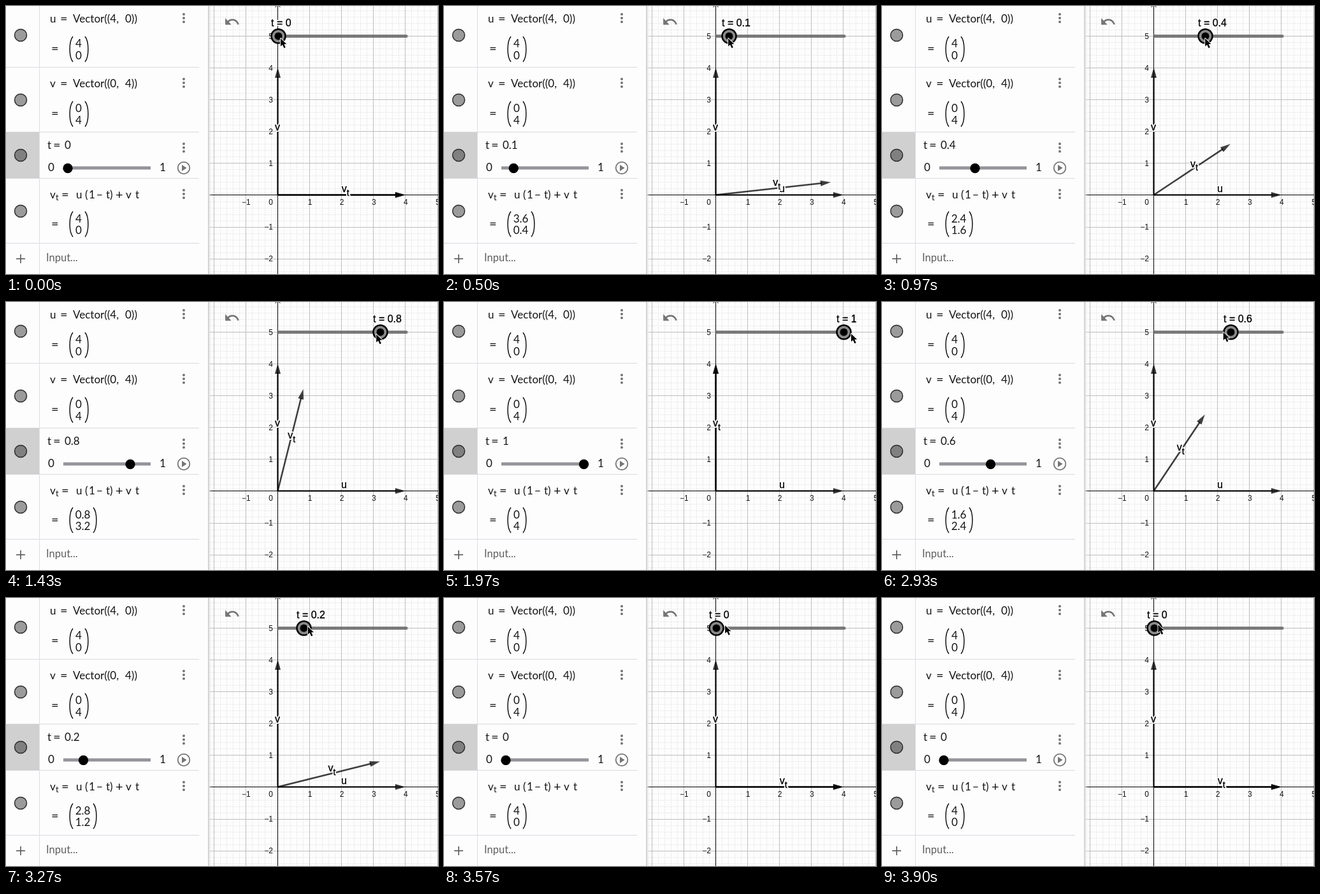
Recreate the animation shown at these times as an HTML page with a canvas. Size 678 by 422 pixels, loop 3930 ms.

```html
<!DOCTYPE html>
<html lang="en">
<head>
<meta charset="utf-8">
<title>Vector interpolation</title>
<style>
html, body { margin: 0; width: 100%; height: 100%; overflow: hidden; background: #fdfdfd; }
canvas { display: block; }
</style>
</head>
<body>
<canvas id="stage" width="678" height="422"></canvas>
<script>
const c = document.getElementById('stage').getContext('2d');
const LOOP = 3930, LAG = 35;
const PAPER = '#fdfdfd', INK = '#141414', GREY = '#757575', MINOR = '#ebebeb';
const OX = 426.5, OY = 297.5, UNIT = 50.1;
const PANEL = '17px Lato, sans-serif', SIGN = '20px Lato, sans-serif';
const GRAPH = '"Liberation Sans", Arial, sans-serif';

// time, pointer x, pointer y, slider value
const keys = [
  [0, 431, 51, 0], [400, 433, 51, .01], [970, 507, 51, .42], [1430, 581, 51, .78],
  [1700, 630, 51, 1], [1970, 639, 50, 1], [2400, 627, 50, 1], [2630, 592, 50, .88],
  [3250, 476, 45, .25], [3600, 438, 43, 0], [3930, 433, 42, 0]
];
const undo = new Path2D('M12.5 8c-2.65 0-5.05.99-6.9 2.6L2 7v9h9l-3.62-3.62c1.39-1.16 3.16-1.88 5.12-1.88 3.54 0 6.55 2.31 7.6 5.5l2.37-.78C21.08 11.03 17.15 8 12.5 8z');
const pointer = new Path2D('M0 0V14L3.3 11L6 17L8.6 15.8L6 10H10.3Z');

function poseAt(ms) {
  const i = Math.max(1, keys.findIndex(k => k[0] > ms)), a = keys[i - 1], b = keys[i];
  const p = (ms - a[0]) / (b[0] - a[0]);
  const [, x, y, v] = a.map((n, j) => n + (b[j] - n) * p);
  return { x, y, tenths: Math.round(v * 10) };
}

function text(s, x, y, font = PANEL, color = INK, align = 'left') {
  c.font = font;
  c.textAlign = align;
  c.fillStyle = color;
  c.fillText(s, x, y);
}

function line(x1, y1, x2, y2, color, width = 1) {
  c.strokeStyle = color;
  c.lineWidth = width;
  c.beginPath();
  c.moveTo(x1, y1);
  c.lineTo(x2, y2);
  c.stroke();
}

function disc(x, y, r, fill, stroke, width = 1.5) {
  c.beginPath();
  c.arc(x, y, r, 0, 7);
  if (fill) { c.fillStyle = fill; c.fill(); }
  if (stroke) { c.strokeStyle = stroke; c.lineWidth = width; c.stroke(); }
}

function triangle(fill, ...p) {
  c.fillStyle = fill;
  c.beginPath();
  for (let i = 0; i < 6; i += 2) c.lineTo(p[i], p[i + 1]);
  c.fill();
}

function haloText(s, x, y, size = 16) {
  c.font = `${size}px ${GRAPH}`;
  c.textAlign = 'left';
  c.lineJoin = 'round';
  c.strokeStyle = PAPER;
  c.lineWidth = 4;
  c.strokeText(s, x, y);
  c.strokeStyle = c.fillStyle = '#000';
  c.lineWidth = .35;
  c.strokeText(s, x, y);
  c.fillText(s, x, y);
}

function matrix(y, top, bottom) {
  const wide = String(top).length > 1 || String(bottom).length > 1;
  const mid = wide ? 120.5 : 114, right = wide ? 137 : 124;
  text('=', 71, y + 6, SIGN);
  text(top, mid, y - 3, PANEL, INK, 'center');
  text(bottom, mid, y + 15.5, PANEL, INK, 'center');
  c.strokeStyle = INK;
  c.lineWidth = 1.5;
  for (const [x, bend] of [[105, -6.5], [right, 6.5]]) {
    c.beginPath();
    c.moveTo(x, y - 20);
    c.bezierCurveTo(x + bend, y - 12, x + bend, y + 12, x, y + 20);
    c.stroke();
  }
}

function drawPanel(n, lagged) {
  c.fillStyle = '#d0d0d0';
  c.fillRect(0, 198, 52, 73);
  for (const y of [96.5, 198.5, 271.5, 373.5]) line(0, y, 303, y, '#d8d8e0');
  line(52.5, 0, 52.5, 422, '#dedee4');
  for (const y of [46, 148, 235, 323]) disc(23, y, 9.5, y === 235 ? '#808080' : '#9b9b9b', '#2c2c2c');
  for (const y of [19, 121, 223, 296])
    for (const d of [-6, 0, 6]) disc(279, y + d, 2, GREY);

  [['u', 26, '4', '0'], ['v', 128, '0', '4']].forEach(([name, y, a, b]) => {
    text(name, 69, y);
    text('=', 85, y + 1, SIGN);
    text(`Vector((${a},`, 105, y);
    text(`${b}))`, 187, y);
    matrix(y + 42, a, b);
  });

  text('t', 65, 225);
  text('=', 74, 226, SIGN);
  text(n / 10, 92, 225);
  text('0', 66, 260);
  text('1', 241, 260);
  line(90, 255, 227, 255, '#94949a', 5);
  disc(97 + n * 12.25, 255.5, 7.7, '#000');
  disc(279, 255, 9.3, null, GREY, 1.8);
  triangle(GREY, 276, 250, 276, 260, 283.5, 255);

  text('t', 78, 306, '13px Lato, sans-serif');
  [['v', 69], ['u', 110], ['(', 124], ['1', 130], ['−', 142], ['t', 157],
   [')', 163], ['v', 188], ['t', 203]].forEach(([s, x]) => text(s, x, 303));
  text('=', 87, 304, SIGN);
  text('+', 172, 304, SIGN);
  matrix(343.5, (40 - 4 * lagged) / 10, 4 * lagged / 10);

  line(16, 398, 30, 398, '#606060', 1.7);
  line(23, 391, 23, 405, '#606060', 1.7);
  text('Input...', 63, 402, '16.5px Lato, sans-serif', '#606060');
}

function drawGrid() {
  const column = (x, color) => { if (x > 319) line(x, 0, x, 422, color); };
  const row = (y, color) => line(319, y, 678, y, color);
  const gridX = i => Math.floor(OX + i * UNIT) + .5;
  const gridY = i => Math.round(OY - i * UNIT) + .5;

  c.setLineDash([3, 1]);
  for (let i = -12; i <= 29; i++) {
    if (i % 5 === 0) continue;
    column(gridX(i / 5), MINOR);
    row(gridY(i / 5), MINOR);
  }
  c.setLineDash([]);
  for (let i = -2; i <= 5; i++) {
    column(gridX(i), '#bebebe');
    if (i) row(gridY(i), '#bebebe');
  }

  line(OX, 0, OX, 422, '#000');
  line(319, OY, 678, OY, '#000');
  line(OX, -2, OX - 4, 2, '#000');
  line(OX, -2, OX + 4, 2, '#000');
  const small = `12px ${GRAPH}`;
  for (let i = -2; i <= 5; i++) {
    const label = String(i).replace('-', '−');
    if (i) text(label, 419, OY - i * UNIT + 4.5, small, INK, 'right');
    else text(label, 419, 313, small, INK, 'right');
    if (i && i > -2) text(label, OX + i * UNIT + .5, 313, small, INK, 'center');
  }
}

function arrow(x, y, color) {
  const angle = Math.atan2(-y, x), len = Math.hypot(x, y) * UNIT;
  c.save();
  c.translate(OX, OY);
  c.rotate(angle);
  line(0, 0, len - 14, 0, color, 2.6);
  triangle(color, len, 0, len - 16, -4.5, len - 16, 4.5);
  c.restore();
}

function drawGraph(n) {
  drawGrid();
  const shade = c.createLinearGradient(317, 0, 323, 0);
  shade.addColorStop(0, '#c4c4c4');
  shade.addColorStop(1, 'rgba(253,253,253,0)');
  c.fillStyle = shade;
  c.fillRect(317, 0, 6, 422);

  c.save();
  c.translate(342, 11);
  c.scale(1.06, 1.15);
  c.fillStyle = GREY;
  c.fill(undo);
  c.restore();

  const t = n / 10, x = 4 - 4 * t, y = 4 * t, len = Math.hypot(x, y);
  arrow(4, 0, 'rgba(0,0,0,.78)');
  arrow(0, 4, 'rgba(0,0,0,.78)');
  arrow(x, y, 'rgba(0,0,0,.75)');
  if (n > 0) haloText('u', 526, 293);
  if (n < 10) haloText('v', 422, 196);
  const lx = OX + x * UNIT / 2 - 4.5 * y / len, ly = OY - y * UNIT / 2 - 1 - 3.5 * x / len;
  haloText('t', lx + 8, ly + 5.5, 14);
  haloText('v', lx, ly);

  const px = 427.5 + 20 * n;
  c.lineCap = 'round';
  line(428, 47.5, 628, 47.5, 'rgba(95,95,95,.8)', 5);
  c.lineCap = 'butt';
  disc(px, 47.5, 11, '#8a8a8a', '#000', 2.5);
  disc(px, 47.5, 6, '#000');
  haloText(`t = ${t}`, px - 11.5, 32);
}

function drawPointer(x, y) {
  c.save();
  c.translate(x, y);
  c.scale(.9, .9);
  c.lineJoin = 'round';
  c.strokeStyle = '#fff';
  c.lineWidth = 2;
  c.stroke(pointer);
  c.fillStyle = '#000';
  c.fill(pointer);
  c.restore();
}

function frame(now) {
  const ms = now % LOOP, pose = poseAt(ms);
  c.fillStyle = PAPER;
  c.fillRect(0, 0, 678, 422);
  drawPanel(pose.tenths, poseAt(Math.max(0, ms - LAG)).tenths);
  drawGraph(pose.tenths);
  drawPointer(pose.x, pose.y);
  requestAnimationFrame(frame);
}
requestAnimationFrame(frame);
</script>
</body>
</html>
```
